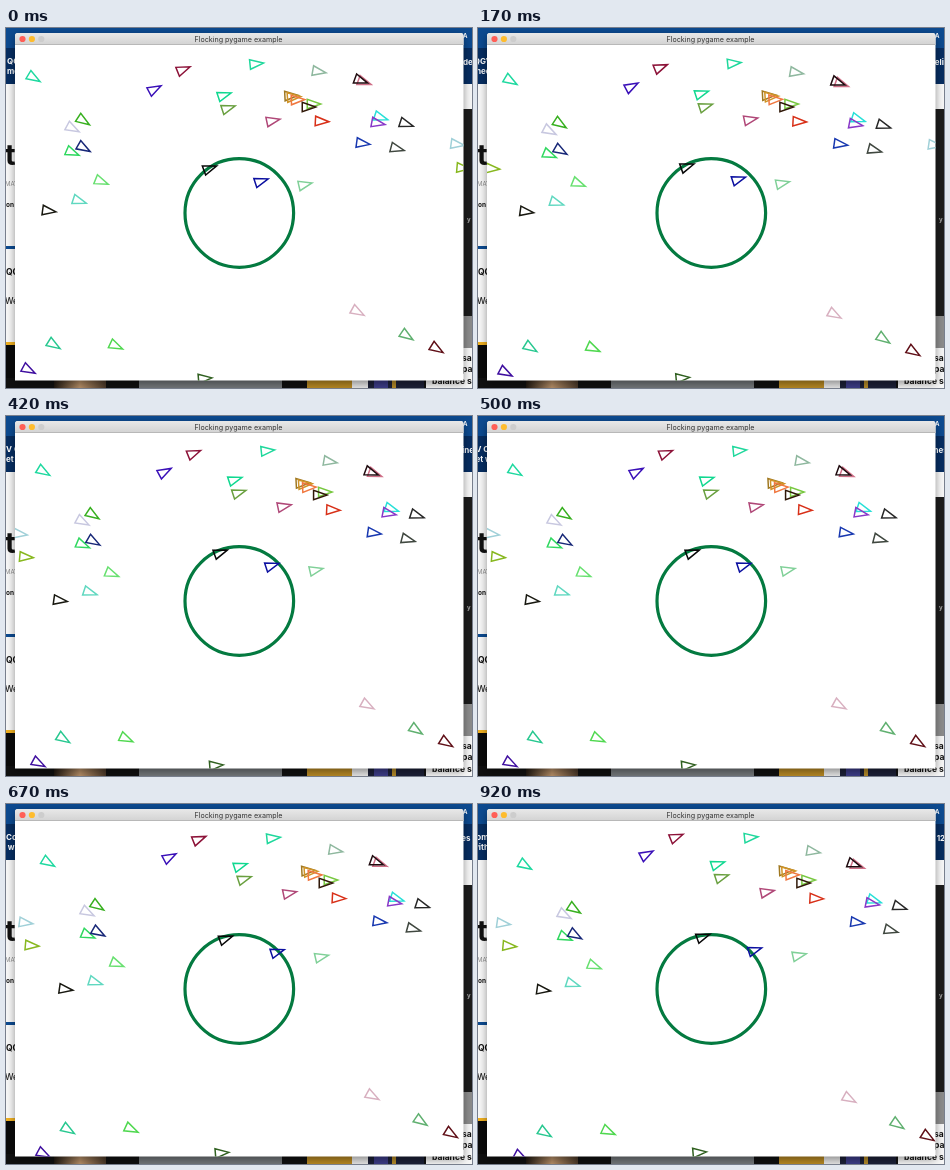
These frames come from a looping animation (466x360 px, 1.01 s). An HTML page with a canvas:

```html
<!DOCTYPE html>
<html lang="en">
<head>
<meta charset="utf-8">
<title>Flocking pygame example</title>
<style>
html, body { margin: 0; width: 466px; height: 360px; overflow: hidden; }
canvas { display: block; }
</style>
</head>
<body>
<canvas id="stage" width="466" height="360"></canvas>
<script>
const ctx = document.getElementById('stage').getContext('2d');
const LOOP = 1010;
const CHANGES = [80, 170, 250, 330, 420, 500, 580, 670, 750, 830, 920];
const SPEED = 2.83;
const WIN = { x: 9, y: 17, w: 448.5, h: 335.5 };
const SHAPE = [[7, 0], [-6.5, 4.8], [-6.5, -4.8]];

// centre x, y, heading in degrees, colour
const boids = [
  [27, 48, 31, '#1fd9a0'], [148, 63, -28, '#3a10b8'], [177, 43.5, -22, '#8c1238'],
  [250.5, 36.5, -6, '#1fd89c'], [313, 42.5, 10, '#8fb89f'], [358, 52, 20, '#d07088'],
  [354.5, 50.5, 20, '#200c10'], [218, 69, -18, '#10d890'], [222, 82, -18, '#6aa040'],
  [267, 94, -12, '#b04878'], [308, 76, 0, '#78c840'], [285.5, 68, -3, '#a07820'],
  [288, 69.5, -4, '#d09428'], [292, 72, -2, '#f07840'], [303, 79, 0, '#301808'],
  [316, 93, 3, '#d83018'], [374.5, 87.5, 18, '#28e0d8'], [372, 94, 11, '#8838c8'],
  [400, 94, 18, '#282828'], [357, 114.5, 8, '#1838b0'], [391, 119, 15, '#404840'],
  [451.5, 115.5, 8, '#a0d0d8'], [457.5, 139.5, 5, '#88b820'], [76.5, 91, 33, '#38b020'],
  [66, 98.5, 28, '#c8c8e0'], [66, 122.5, 23, '#30d860'], [77, 118, 30, '#182878'],
  [95, 151.5, 22, '#68e070'], [73, 171, 18, '#60d8c0'], [43, 182, 8, '#181810'],
  [203.5, 142.5, -20, '#080808'], [255, 155, -18, '#0c10a0'], [299, 158, -13, '#80d098'],
  [351, 282, 29, '#d8b0c0'], [47, 315, 32, '#28c890'], [109.5, 316, 25, '#50d850'],
  [22, 340, 28, '#4010a0'], [199, 351, -5, '#306020'], [400, 306, 34, '#60b070'],
  [430, 319, 32, '#601018']
];

function box(x, y, w, h, color) {
  ctx.fillStyle = color;
  ctx.fillRect(x, y, w, h);
}

function label(text, x, y, size, color = '#111', weight = 700) {
  ctx.font = `${weight} ${size}px Inter, sans-serif`;
  ctx.fillStyle = color;
  ctx.fillText(text, x, y);
}

function dot(x, y, r, color) {
  ctx.fillStyle = color;
  ctx.beginPath();
  ctx.arc(x, y, r, 0, 7);
  ctx.fill();
}

function drawPage(scroll) {
  box(0, 0, 466, 360, '#f8f8f8');
  box(0, 0, 466, 20, '#0c4a90');
  box(0, 20, 466, 36, '#062d61');
  label('A', 457, 10, 6, '#fff');
  label('QGV Commissioner', 1 - scroll, 36, 8, '#fff');
  label('meet with leaders', 1 - scroll, 46, 8, '#fff');
  label('delines 12,000', 457 - scroll, 37, 8, '#fff');

  label('t', -1, 137, 29);
  label('MAY', -1, 158, 6, '#888', 400);
  label('on', 0, 179, 6.5);
  box(0, 218, 9, 3, '#0c4a90');
  label('QGV', 0, 247, 8.5);
  label("We're", -1, 276, 8.5, '#222', 500);
  box(0, 314, 9, 3, '#f0b020');
  box(0, 317, 9, 43, '#0a0a0a');

  box(457, 81, 9, 215, '#1c1c1c');
  label('y', 461, 194, 6, '#aaa');
  box(457, 288, 9, 32, '#8c8c8c');

  box(0, 350, 420, 10, '#101010');
  const tan = ctx.createLinearGradient(48, 0, 100, 0);
  tan.addColorStop(0, '#201810');
  tan.addColorStop(0.5, '#b89068');
  tan.addColorStop(1, '#4a3828');
  box(48, 350, 52, 10, tan);
  box(133, 350, 143, 10, '#74787b');
  box(301, 350, 45, 10, '#b98a24');
  box(346, 350, 16, 10, '#e8e8e8');
  box(362, 350, 56, 10, '#1c2038');
  box(368, 350, 14, 10, '#3c3c88');
  box(386, 350, 4, 10, '#b58b28');
  label('sa', 456, 333, 8.5);
  label('pa', 456, 344, 8.5);
  label('balance s', 426, 356, 8.5);
}

function drawWindow() {
  ctx.save();
  ctx.shadowColor = 'rgba(0,0,0,.42)';
  ctx.shadowBlur = 9;
  ctx.shadowOffsetY = 3;
  ctx.fillStyle = '#fff';
  ctx.beginPath();
  ctx.roundRect(WIN.x, 5, WIN.w, WIN.y + WIN.h - 5, [3, 3, 0, 0]);
  ctx.fill();
  ctx.restore();

  const bar = ctx.createLinearGradient(0, 5, 0, 17);
  bar.addColorStop(0, '#e8e8e8');
  bar.addColorStop(1, '#d2d2d2');
  ctx.fillStyle = bar;
  ctx.beginPath();
  ctx.roundRect(WIN.x, 5, WIN.w, 12, [3, 3, 0, 0]);
  ctx.fill();
  box(WIN.x, 16, WIN.w, 1, '#b8b8b8');
  ['#ff5f57', '#febc2e', '#cdcdcd'].forEach((c, i) => dot(16.5 + i * 9.4, 11, 3.1, c));
  ctx.textAlign = 'center';
  label('Flocking pygame example', 232.5, 14, 7.15, '#333', 400);
  ctx.textAlign = 'left';
}

const middle = list => (Math.min(...list) + Math.max(...list)) / 2;

function drawBoid([x, y, heading, color], step) {
  const a = heading * Math.PI / 180, c = Math.cos(a), s = Math.sin(a);
  const xs = SHAPE.map(([u, v]) => u * c - v * s);
  const ys = SHAPE.map(([u, v]) => u * s + v * c);
  let px = x + c * SPEED * step;
  if (px > 458) px -= WIN.w;
  const dx = px - middle(xs);
  const dy = y + s * SPEED * step - middle(ys);
  ctx.strokeStyle = color;
  ctx.lineWidth = 1.5;
  ctx.beginPath();
  xs.forEach((vx, i) => ctx.lineTo(vx + dx, ys[i] + dy));
  ctx.closePath();
  ctx.stroke();
}

function draw(now) {
  const t = now % LOOP;
  const tick = CHANGES.filter(c => c <= t).length;
  // the flock advances 8 times in 11 screen updates
  const step = Math.floor(tick * 8 / 11 + 0.55);

  drawPage(tick * 2.6);
  drawWindow();

  ctx.save();
  ctx.beginPath();
  ctx.rect(WIN.x, WIN.y, WIN.w, WIN.h);
  ctx.clip();
  ctx.strokeStyle = '#047a40';
  ctx.lineWidth = 3.2;
  ctx.beginPath();
  ctx.arc(233.3, 185, 54.3, 0, 7);
  ctx.stroke();
  boids.forEach(b => drawBoid(b, step));
  ctx.restore();
}

const start = performance.now();
function loop() {
  draw(performance.now() - start);
  requestAnimationFrame(loop);
}
loop();
</script>
</body>
</html>
```
